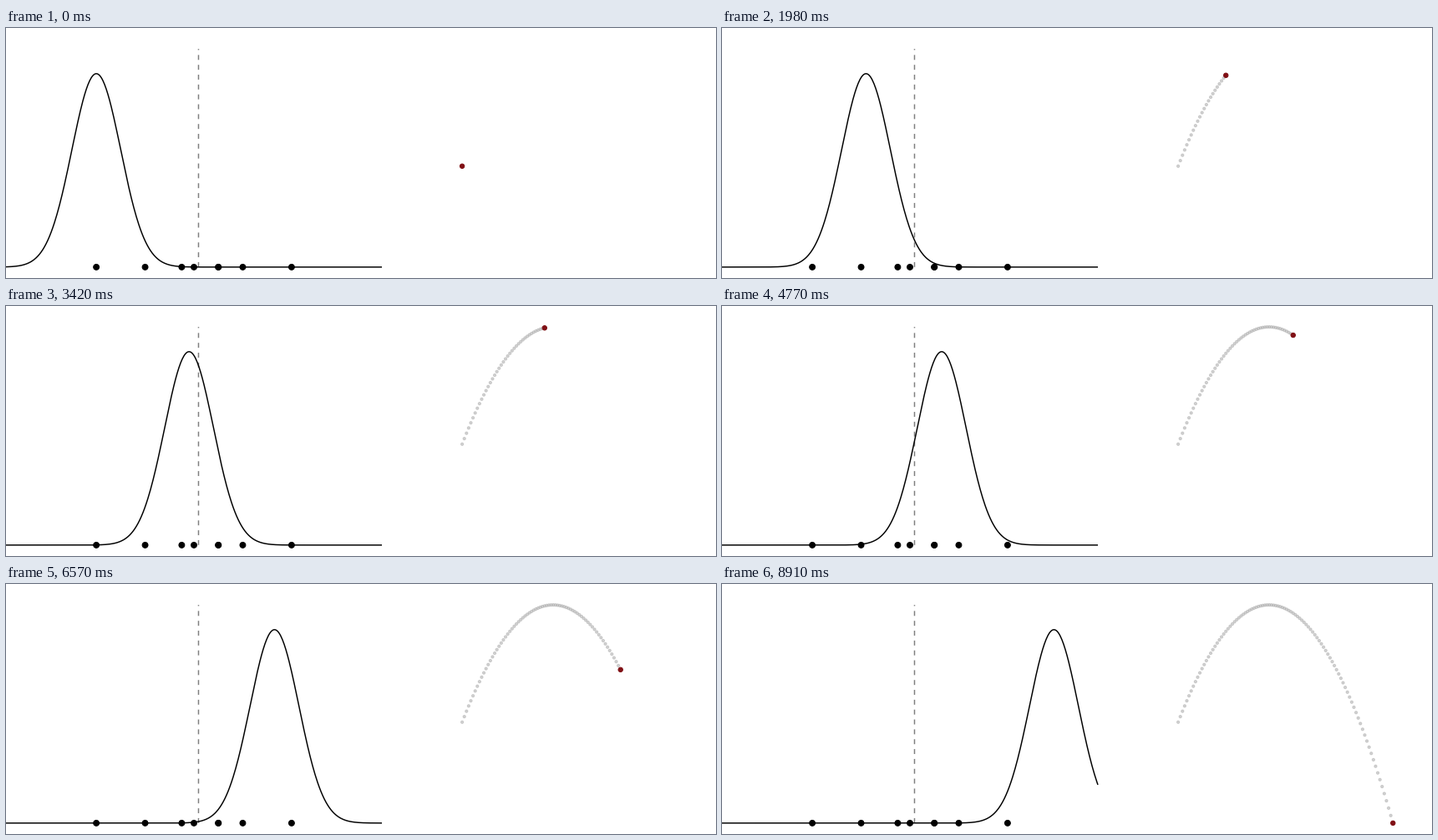
A matplotlib script that plays this animation: 850x300 px, repeating every 9000 ms.

```python
import numpy as np
import matplotlib.pyplot as plt
from matplotlib.animation import FuncAnimation
from matplotlib.patches import Circle

W, H, DPI = 850, 300, 100
FRAMES, INTERVAL = 100, 90
SPLIT = 450                      # left panel width
BASE, TOP = 286.9, 25.1          # y of the axis and of the upper limit
LINE, STROKE = 1.48, 0.98        # line widths in pixels

data = np.array([0, 2, 3.5, 4, 5, 5, 6, 8])
mean = data.mean()
mus = np.arange(FRAMES) / 10


def pt(px):
    return px * 72 / DPI


def left_x(v):
    return (v + 3.7) * SPLIT / 15.4


def right_x(v):
    return SPLIT + (v + 3.7) * (W - SPLIT) / 15.4


def density_y(x, mu):
    pdf = np.exp(-(x - mu) ** 2 / 2) / np.sqrt(2 * np.pi)
    return BASE - (BASE - TOP) * pdf / 0.45


def likelihood_y(mu):
    return TOP + (BASE - TOP) * ((mu - mean) / (mus[-1] - mean)) ** 2


def dot(x, y, r, color, z, alpha=None):
    return ax.add_patch(Circle((x, y), r, facecolor=color, edgecolor=color,
                               lw=pt(STROKE), alpha=alpha, zorder=z))


fig = plt.figure(figsize=(W / DPI, H / DPI), dpi=DPI, facecolor="white")
ax = fig.add_axes([0, 0, 1, 1])
ax.set_xlim(0, W)
ax.set_ylim(H, 0)
ax.axis("off")

xs = np.linspace(-3.7, 11.7, 451)
curve, = ax.plot(left_x(xs), density_y(xs, 0), color="black", lw=pt(LINE),
                 solid_capstyle="butt", snap=False, zorder=2)
ax.plot([left_x(mean)] * 2, [BASE, TOP], color="#7f7f7f", lw=pt(LINE),
        dashes=(4, 4), dash_capstyle="butt", snap=False, zorder=1)
for v in data:
    dot(left_x(v), BASE, 3.45, "black", 3)

trail = [dot(right_x(m), likelihood_y(m), 1.6, "#a9a9a9", 2, 0.5)
         for m in mus]
head = dot(right_x(0), likelihood_y(0), 2.7, "#801015", 4)


def update(i):
    mu = mus[i]
    curve.set_ydata(density_y(xs, mu))
    for k, d in enumerate(trail):
        d.set_visible(k < i)
    head.center = right_x(mu), likelihood_y(mu)
    return [curve, head, *trail]


anim = FuncAnimation(fig, update, frames=FRAMES, interval=INTERVAL,
                     init_func=lambda: update(0), repeat=True, repeat_delay=0)
plt.show()
```
